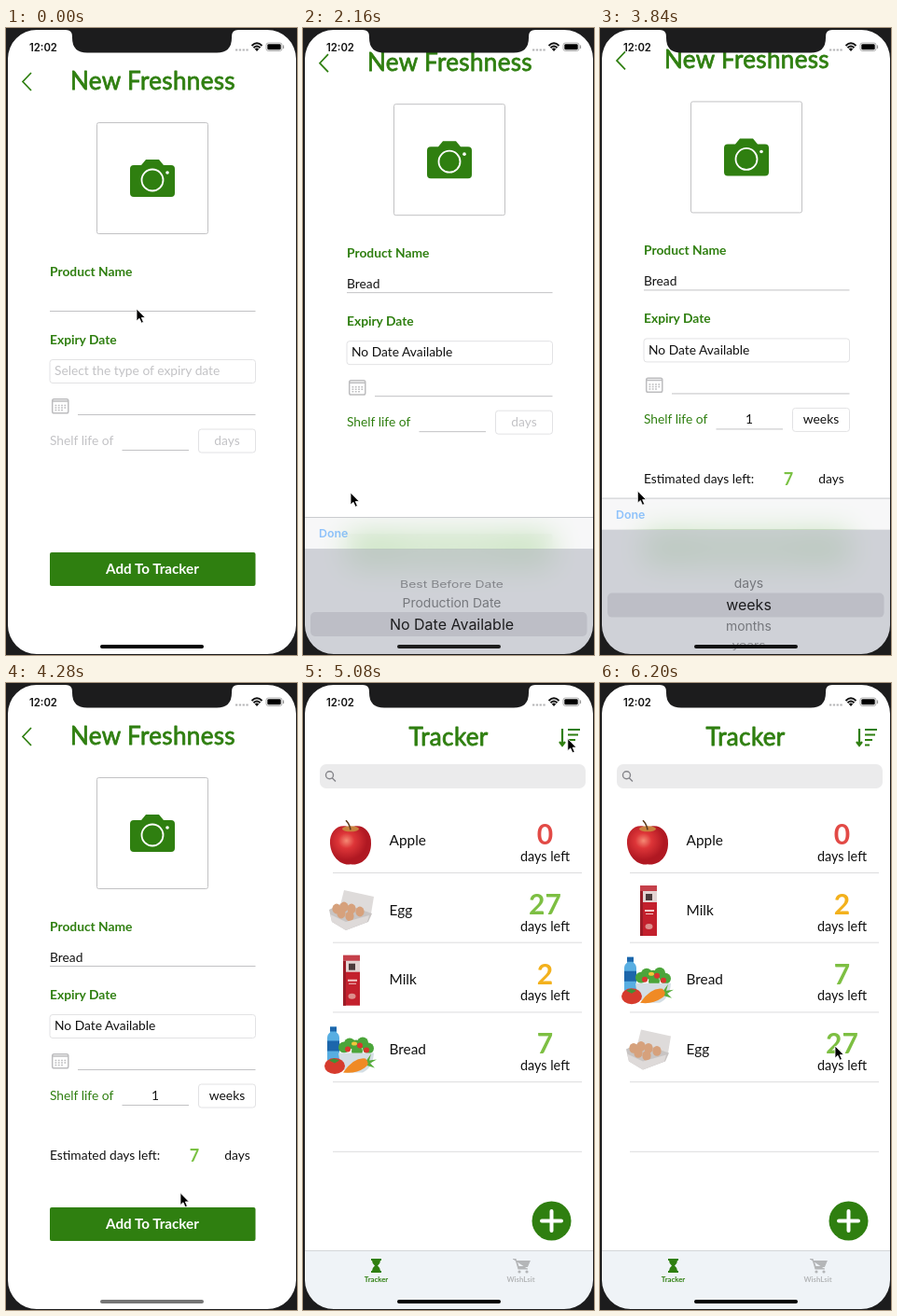
Animation of 312 by 672 pixels, one loop 6.24 s. Source, as an HTML page:

```html
<!DOCTYPE html>
<html lang="en">
<head>
<meta charset="utf-8">
<title>Freshness tracker</title>
<style>
html, body { margin: 0; width: 100%; height: 100%; overflow: hidden; background: #fff; }
body { position: relative; }
svg, div { position: absolute; left: 0; top: 0; }
svg { width: 312px; height: 672px; overflow: visible; }
text { font: 13.8px Lato, sans-serif; fill: #111; white-space: pre; }
.mid { text-anchor: middle; }
.green { fill: #2f7f10; }
.label { font-weight: 700; fill: #2f7f10; }
.title { font-size: 26px; letter-spacing: .35px; fill: #2f7f10; stroke: #2f7f10; stroke-width: .8; stroke-linejoin: round; }
.ui { font-family: Inter, sans-serif; }
.hint { fill: #c3c3c6; }
.line { stroke: #c2c2c4; fill: none; }
.box { stroke: #e2e2e4; fill: none; }
.item { font-size: 15.4px; }
.count { font-size: 30px; font-weight: 700; }
.left { font-size: 14.4px; }
.tab { font-size: 7.8px; font-weight: 700; }
.glass { overflow: hidden; backdrop-filter: blur(16px) saturate(1.8); }
#panel { top: 478px; width: 312px; height: 194px; }
#bar { width: 312px; height: 33px; border-top: 1px solid #c9cbce; background: rgba(246,246,247,.82); }
#wheel { top: 34px; width: 312px; height: 160px; background: rgba(203,206,212,.92); }
#sheet { width: 312px; height: 672px; }
#options { left: 8px; top: 464px; width: 297px; height: 132px; border-radius: 10px; background: rgba(246,246,246,.88); }
#cancel { left: 8px; top: 602px; width: 297px; height: 43px; border-radius: 10px; background: #fff; }
.blue { fill: #007aff; }
</style>
</head>
<body>
<svg id="list">
  <rect width="312" height="672" fill="#fff"/>
  <text class="title mid" x="156" y="67">Tracker</text>
  <path d="M278 49V66M275 63L278 67L281 63M284 50H297M284 55.5H295M284 61H292M284 66.5H289" fill="none" stroke="#2f7f10" stroke-width="2.2"/>
  <rect x="18" y="87" width="285" height="26" rx="7" fill="#ebebec"/>
  <path d="M31.5 102L35 105.5M32.5 98.8a4 4 0 1 1-8 0a4 4 0 1 1 8 0" fill="none" stroke="#85858a" stroke-width="1.4"/>
  <defs><radialGradient id="red" cx=".4" cy=".38"><stop stop-color="#f58a74"/><stop offset=".4" stop-color="#dd3538"/><stop offset="1" stop-color="#b01822"/></radialGradient></defs>
  <g id="rows"></g>
  <path id="rules" stroke="#dcdcde"/>
  <circle cx="266.5" cy="576.5" r="21" fill="#2f7f10"/>
  <path d="M256 576.5H277M266.5 566V587" stroke="#fff" stroke-width="4" stroke-linecap="round"/>
  <rect y="609" width="312" height="63" fill="#eff3f7"/>
  <path d="M0 608.5H312" stroke="#d3d6d9"/>
  <path class="green" d="M73 617H84V619H83Q83 622 80 624.5Q83 627 83 630H84V632H73V630H74Q74 627 77 624.5Q74 622 74 619H73Z"/>
  <text class="tab mid green" x="78.5" y="642">Tracker</text>
  <path d="M225 617.5H228L231 628H241M229 619.5H243L240.5 625.5H231Z" fill="#b4b6b8" stroke="#b4b6b8" stroke-width="1.2"/>
  <circle cx="232" cy="631" r="1.6" fill="#b4b6b8"/><circle cx="240" cy="631" r="1.6" fill="#b4b6b8"/>
  <text class="tab mid" x="233.5" y="642" style="fill:#b4b6b8">WishLsit</text>
  <rect id="dim" width="312" height="672" opacity="0"/>
</svg>

<svg id="form">
  <rect width="312" height="720" fill="#fff"/>
  <path d="M27 48L18 57.5L27 67" fill="none" stroke="#2f7f10" stroke-width="1.7"/>
  <text class="title mid" x="157.5" y="65.5">New Freshness</text>
  <rect class="line" x="97.5" y="101.5" width="119" height="119" rx="2"/>
  <path class="green" d="M137 147H145L150 141H164L169 147H177Q181 147 181 151V177Q181 181 177 181H137Q133 181 133 177V151Q133 147 137 147Z"/>
  <circle cx="157" cy="163" r="11.5" fill="none" stroke="#fff" stroke-width="1.8"/>
  <circle cx="173" cy="155" r="1.8" fill="#fff"/>
  <text class="label" x="47" y="265.5">Product Name</text>
  <text id="name" x="47" y="299"></text>
  <path class="line" d="M47 303.5H267.5M77 414.5H267.5M124.5 452.5H196"/>
  <text class="label" x="47" y="338.5">Expiry Date</text>
  <rect class="box" x="47" y="355.5" width="220.5" height="25" rx="3"/>
  <text id="type" x="52" y="372.3"></text>
  <path d="M49.7 399.5Q49.7 397.7 51.5 397.7H65Q66.8 397.7 66.8 399.5V411Q66.8 412.8 65 412.8H51.5Q49.7 412.8 49.7 411ZM49.7 400H66.8" fill="none" stroke="#bdbdbf" stroke-width="1.5"/>
  <path d="M52.5 404.5H64.5M52.5 407H64.5M52.5 409.5H61" stroke="#bdbdbf" stroke-width="1.5" stroke-dasharray="1.8 1.5"/>
  <text id="shelf" x="47" y="447">Shelf life of</text>
  <text id="amount" class="mid" x="160" y="447"></text>
  <rect class="box" x="206.5" y="430" width="61" height="25" rx="3"/>
  <text id="unit" class="mid" x="237" y="447"></text>
  <g id="estimate">
    <text x="47" y="511">Estimated days left:</text>
    <text class="mid" x="202" y="512.5" style="font-size:18px;font-weight:700;fill:#7ac143">7</text>
    <text class="mid" x="248" y="511">days</text>
  </g>
  <rect class="green" x="47" y="562" width="220.5" height="36" rx="2"/>
  <text class="mid" x="157" y="585" style="font-size:15.2px;font-weight:700;fill:#fff">Add To Tracker</text>
  <rect id="caret" width="1.8" height="17" fill="#3f74e0"/>
</svg>

<div id="panel">
  <div class="glass" style="width:312px;height:194px"></div>
  <div id="bar"><svg><text id="done" class="ui blue" x="17" y="21" style="font-size:12.4px;font-weight:600">Done</text></svg></div>
  <div id="wheel"><svg id="items"><rect x="8" y="68" width="296.5" height="26" rx="5" fill="#767680" opacity=".2"/></svg></div>
</div>

<div id="sheet">
  <div id="options" class="glass"><svg>
    <path d="M0 46.5H297M0 89.5H297" stroke="#cfcfd2"/>
    <text class="ui mid" x="148.5" y="21" style="font-size:9.6px;font-weight:600;fill:#8b8b8f">Sort items by:</text>
    <text class="ui mid blue" x="148.5" y="73">Expiration Date</text>
    <text class="ui mid blue" x="148.5" y="116">Date Added</text>
  </svg></div>
  <div id="cancel"><svg><text class="ui mid blue" x="148.5" y="26.5" style="font-weight:600">Cancel</text></svg></div>
</div>

<svg id="phone">
  <path fill="#1c1c1d" fill-rule="evenodd" d="M-1-1H313V673H-1ZM33 2H280A31 31 0 0 1 311 33V640A31 31 0 0 1 280 671H33A31 31 0 0 1 2 640V33A31 31 0 0 1 33 2Z"/>
  <path fill="#1c1c1d" d="M64 0V2Q71 2 71 9V10.5Q71 26.500 87 26.500H226Q242 26.500 242 10.500V9Q242 2 249 2V0Z"/>
  <text class="ui" x="25" y="24.500" style="font-size:11.3px;font-weight:600">12:02</text>
  <path d="M246 23.5H260" stroke="#b5b5b7" stroke-width="2" stroke-dasharray="2.3 1.5"/>
  <path d="M263.5 19Q269 13.5 274.5 19M265.5 21.2Q269 17.8 272.5 21.2" fill="none" stroke="#111" stroke-width="1.9"/>
  <path d="M266.8 22.5Q269 20.5 271.2 22.5L269 25Z"/>
  <rect x="279" y="16" width="17" height="8.5" rx="2.3" fill="none" stroke="#999" stroke-width=".8"/>
  <rect x="280.3" y="17.3" width="14.4" height="5.9" rx="1.3"/>
  <path d="M297.5 18.5V22" stroke="#999" stroke-width="1.2"/>
  <rect id="home" x="101" y="661" width="111" height="4" rx="2"/>
  <path id="cursor" d="M0 0V13L3 10.3L5.2 15.2L7.4 14.2L5.3 9.5H9.3Z" stroke="#fff" stroke-width=".8"/>
</svg>

<script>
const LOOP = 6240, GREEN = '#7dbf42';
const $ = id => document.getElementById(id);
const lerp = (a, b, k) => a + (b - a) * k;
const ramp = (t, a, b) => Math.min(1, Math.max(0, (t - a) / (b - a)));
const ease = (t, a, b) => { const x = ramp(t, a, b); return x * x * (3 - 2 * x); };
const within = (t, a, b) => t >= a && t < b;
const show = (id, on) => { $(id).style.visibility = on ? 'visible' : 'hidden'; };

// Linear interpolation through [time, ...values]
function follow(t, keys) {
  let i = 0;
  while (i < keys.length - 2 && t > keys[i + 1][0]) i++;
  const a = keys[i], b = keys[i + 1], k = ramp(t, a[0], b[0]);
  return a.slice(1).map((v, j) => lerp(v, b[j + 1], k));
}

const oval = (x, y, rx, ry, fill) => `<ellipse cx="${x}" cy="${y}" rx="${rx}" ry="${ry}" fill="${fill}"/>`;
const shape = (d, fill) => `<path d="${d}" fill="${fill}"/>`;
const art = {
  Apple: shape('M51-13C40-19 28-11 29 4C30 18 41 28 51 26C63 28 73 18 73 4C74-11 61-19 51-13Z', 'url(#red)') +
    oval(51, -12, 9, 3, '#c9823f') + '<path d="M51-11Q50-17 46-21" stroke="#5b3a1c" stroke-width="1.6" fill="none"/>',
  Egg: shape('M44-21L76-14L73 4L40-5Z', '#dedbda') + shape('M28 0L42-7L74 4L70 13L46 22L31 13Z', '#c8c4c3') +
    [[36, -1], [44, -3], [52, -1], [61, 2], [41, 4], [50, 7]].map(([x, y]) => oval(x, y, 4.6, 5.4, '#d6a17c')).join('') +
    shape('M29 5L46 13L71 6L69 13L46 22L31 13Z', '#dedad9'),
  Milk: shape('M43-26H61V-7H43Z', '#e3d3d2') + shape('M43-26H61V-20H43Z', '#c5404a') +
    shape('M43-8H61V28H43Z', '#c3202d') + shape('M43-20H46V28H43Z', '#9b1c27') +
    shape('M49-17H56V-10H49Z', '#4a3a3b') + shape('M48 0H58V2H48ZM49 4H57V5H49Z', '#f3c9c9') + oval(52.5, 18, 4, 3, '#dd8f8d'),
  Bread: shape('M29-24H36V-18Q39-16 39-12V12H26V-12Q26-16 29-18Z', '#58aee2') + shape('M29-24H36V-19H29ZM26-9H39V2H26Z', '#1c66ab') +
    [[44, -2], [50, -6], [57, -4], [64, -7], [70, -1], [58, 2]].map(([x, y]) => oval(x, y, 6, 6, '#4ba53a')).join('') +
    [[48, 0], [61, -4], [68, 1]].map(([x, y]) => oval(x, y, 3, 3, '#d9362e')).join('') + oval(55, -6, 3, 2, '#f2c53b') +
    shape('M38 4H76Q75 20 64 25H47Q39 19 38 4Z', '#d4dee4') +
    shape('M67 13L78 8M68 12L73 5L71 12L79 11L72 15L77 20L67 17Z', '#56ad3b') +
    shape('M43 25Q55 8 67 10Q73 16 66 20Q56 27 43 25Z', '#f08a24') +
    oval(34, 18, 11, 8.5, '#d63b2d') + shape('M28 12L33 10L39 12L34 15Z', '#3f9235')
};
const food = [['Apple', 0, '#e24a46'], ['Egg', 27, GREEN], ['Milk', 2, '#f3b11c'], ['Bread', 7, GREEN]];
const added = [0, 1, 2, 3], sorted = [0, 3, 1, 2];
const rowY = i => 168.3 + 74.7 * i;

$('rows').innerHTML = food.map(([name, days, color]) => `<g>${art[name]}
  <text class="item" x="92.5" y="5.5">${name}</text>
  <text class="count mid" x="259.5" y="5" style="fill:${color}">${days}</text>
  <text class="left mid" x="259.5" y="22.7">days left</text></g>`).join('');
$('rules').setAttribute('d', [0, 1, 2, 3, 4].map(i => `M32 ${rowY(i) + 35.2}H299`).join(''));

const types = ['Best Before Date', 'Production Date', 'No Date Available'];
const units = ['days', 'weeks', 'months', 'years'];
const spokes = units.map(() => {
  const el = document.createElementNS('http://www.w3.org/2000/svg', 'text');
  el.setAttribute('class', 'ui mid');
  $('items').append(el);
  return el;
});

function turnWheel(names, pos) {
  spokes.forEach((el, i) => {
    const angle = (i - pos) * .363, near = Math.max(0, 1 - Math.abs(i - pos) * 2);
    const tilt = Math.max(0, Math.cos(angle)), size = near ? 1.16 : 1.01;
    el.textContent = names[i] || '';
    el.style.fill = near ? '#1d1d1f' : '#75777c';
    el.setAttribute('opacity', near ? 1 : Math.min(1, tilt + .1));
    el.setAttribute('transform', `translate(159.5 ${81 + 64.8 * Math.sin(angle)}) scale(${size} ${size * tilt}) translate(0 5)`);
  });
}

function field(id, value, hint) {
  $(id).textContent = value || hint;
  $(id).classList.toggle('hint', !value);
}

function placeCaret(t) {
  const width = id => $(id).getComputedTextLength();
  const spot = within(t, 60, 1180) ? [47 + width('name'), 285]
    : within(t, 1180, 2080) ? [t < 1600 ? 52 : 53 + width('type'), 359]
    : within(t, 2460, 3020) ? [160 + width('amount') / 2, 434]
    : within(t, 3020, 3790) ? [t < 3300 ? 221 : 238 + width('unit') / 2, 434] : null;
  show('caret', spot);
  if (!spot) return;
  $('caret').setAttribute('x', spot[0]);
  $('caret').setAttribute('y', spot[1]);
}

const path = [
  [0, 140, 301], [1000, 140, 301], [1160, 150, 362], [1260, 150, 362], [1480, 165, 605], [1680, 165, 600],
  [1920, 165, 550], [2060, 51, 498], [2180, 51, 498], [2420, 160, 438], [2880, 160, 438], [3000, 236, 438],
  [3050, 236, 438], [3160, 208, 550], [3260, 208, 590], [3480, 206, 565], [3720, 40, 496], [3840, 40, 496],
  [4280, 187, 546], [4340, 186, 574], [4400, 186, 574], [4680, 193, 288], [4940, 284, 58], [5080, 284, 58],
  [5380, 222, 538], [5580, 222, 538], [6140, 252, 389]
];

function draw(t) {
  const first = ease(t, 1190, 1320) - ease(t, 2104, 2284);
  const second = ease(t, 3030, 3140) - ease(t, 3800, 3980);
  const open = first + second;
  const pop = ease(t, 4400, 4580);
  const sheet = ease(t, 5090, 5230) - ease(t, 5514, 5674);
  const typePos = 2 * ease(t, 1600, 1960), unitPos = ease(t, 3240, 3480);

  field('name', 'Bread'.slice(0, Math.floor(6 * ramp(t, 360, 960))), '');
  field('type', t < 1600 ? '' : types[Math.round(typePos)], 'Select the type of expiry date');
  field('amount', t < 2700 ? '' : '1', '');
  field('unit', t < 3300 ? '' : units[Math.round(unitPos)], 'days');
  $('shelf').setAttribute('class', t < 1800 ? 'hint' : 'green');
  show('estimate', t >= 3800);
  placeCaret(t);

  $('form').style.transform = `translate(${314 * pop}px,${-26 * open}px)`;
  $('panel').style.transform = `translateY(${194 * (1 - open)}px)`;
  show('panel', open > 0);
  $('done').setAttribute('opacity', within(t, 2080, 2290) || within(t, 3790, 3990) ? .42 : 1);
  if (t < 2600) turnWheel(types, typePos); else turnWheel(units, unitPos);

  $('list').style.transform = `translateX(${-94 * (1 - pop)}px)`;
  $('dim').setAttribute('opacity', Math.max(.1 * (1 - ramp(t, 4560, 4760)), .23 * sheet));
  const order = t < 5700 ? added : sorted;
  [...$('rows').children].forEach((row, i) => row.setAttribute('transform', `translate(0 ${rowY(order[i])})`));
  $('sheet').style.transform = `translateY(${208 * (1 - sheet)}px)`;
  show('sheet', sheet > 0);

  // The home bar fades to grey whenever the form is at rest
  const light = ramp(t, 40, 240) * (1 - open) * (1 - pop);
  $('home').setAttribute('fill', `rgb(${Array(3).fill(Math.round(118 * light))})`);
  $('cursor').setAttribute('transform', `translate(${follow(t, path)})`);
}

function tick(now) {
  draw(now % LOOP);
  requestAnimationFrame(tick);
}
draw(0);
requestAnimationFrame(tick);
</script>
</body>
</html>
```
